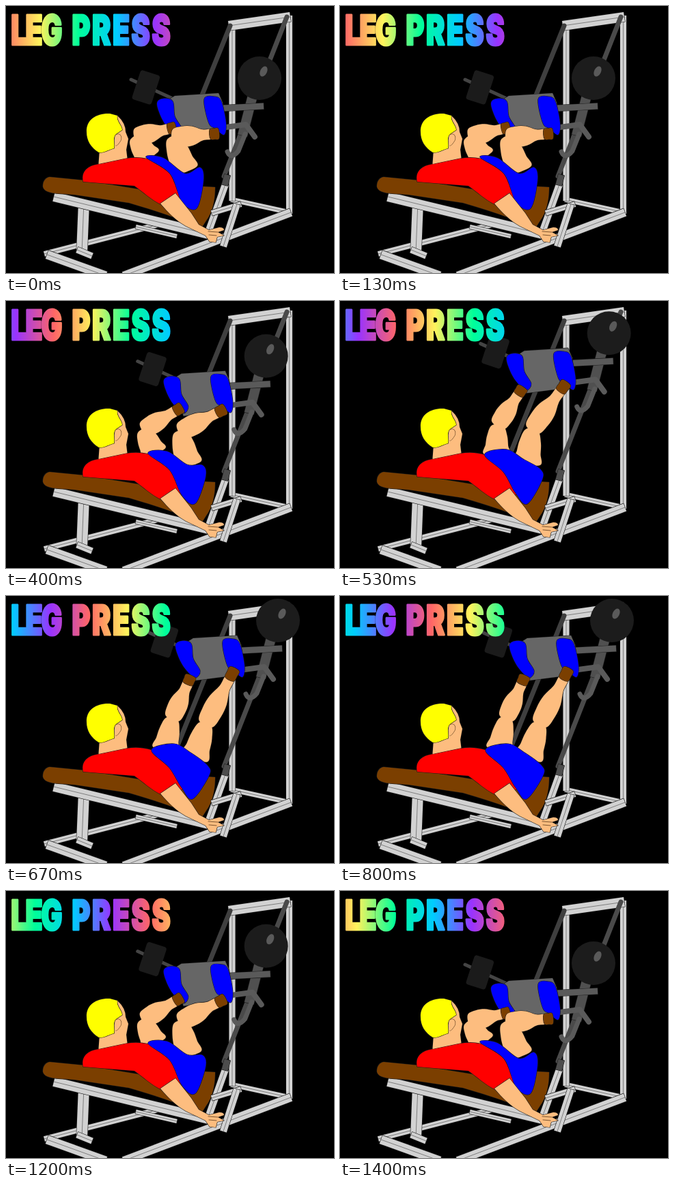
These frames come from a looping animation (480x392 px, 1470 ms). An HTML page:

```html
<!DOCTYPE html>
<html lang="en">
<head>
<meta charset="utf-8">
<title>Leg press</title>
<style>
  html, body { margin: 0; width: 100%; height: 100%; overflow: hidden; background: #000; }
  svg { display: block; width: 100vw; height: 100vh; }
  .word { font: 900 61px Inter, Roboto, "Open Sans", sans-serif; }
</style>
</head>
<body>
<svg id="stage" viewBox="0 0 480 392" stroke-linejoin="round" stroke-linecap="round">
  <defs>
    <linearGradient id="rainbow" gradientUnits="userSpaceOnUse" spreadMethod="repeat" x1="0" y1="0" x2="418" y2="0">
      <stop offset="0" stop-color="#ff6666"/>
      <stop offset=".2" stop-color="#fff35c"/>
      <stop offset=".4" stop-color="#00ff99"/>
      <stop offset=".6" stop-color="#00ccff"/>
      <stop offset=".8" stop-color="#9933ff"/>
      <stop offset="1" stop-color="#ff6666"/>
    </linearGradient>
  </defs>
  <rect width="480" height="392"/>
  <g id="rack"></g>
  <g id="farWeight"></g>
  <g id="sled"></g>
  <g id="bench"></g>
  <g id="body"></g>
  <g transform="translate(8 0) scale(.67 1)" fill="url(#rainbow)" stroke="url(#rainbow)" stroke-width="3.2">
    <text class="word" x="-1" y="56.8" letter-spacing="-3">LEG</text>
    <text class="word" x="132" y="56.8" letter-spacing="4">PRESS</text>
  </g>
</svg>
<script>
const LOOP = 1470, STEPS = 22, HOLD = 210, PERIOD = 418;
const STEEL = '#d2d2d2', GREY = '#5a5a5a', SKIN = '#fdbd7f', RED = '#ff0000', BLUE = '#0000ff', BROWN = '#7b3f00';
const $ = id => document.getElementById(id);

function add(parent, tag, attrs) {
  const el = document.createElementNS('http://www.w3.org/2000/svg', tag);
  for (const key in attrs) el.setAttribute(key, attrs[key]);
  return $(parent).appendChild(el);
}

const shape = (parent, fill, d = '', line = '#1a1a1a') =>
  add(parent, 'path', { d, fill, stroke: line, 'stroke-width': 1.2, 'paint-order': 'stroke' });
const rod = (parent, color, width, d) =>
  add(parent, 'path', { d, fill: 'none', stroke: color, 'stroke-width': width });

const mix = (a, b, t) => a.map((v, i) => v + (b[i] - v) * t);
const points = text => text.split(', ').map(pair => pair.split(' ').map(Number));

// Both sides of a bar from a to b, with the widths spread evenly along it
function sides(a, b, widths) {
  const dx = b[0] - a[0], dy = b[1] - a[1], len = Math.hypot(dx, dy);
  const edge = side => widths.map((w, i) => {
    const [x, y] = mix(a, b, i / (widths.length - 1)), r = side * w / 2 / len;
    return [x - dy * r, y + dx * r];
  });
  return [...edge(1), ...edge(-1).reverse()];
}

// Closed smooth curve through the points
function blob(p) {
  const at = i => p[(i + p.length) % p.length];
  const ctrl = (a, b, c) => a.map((v, k) => v + (c[k] - b[k]) / 6);
  return 'M' + p[0] + p.map((q, i) => {
    const next = at(i + 1);
    return 'C' + [ctrl(q, at(i - 1), next), ctrl(next, at(i + 2), q), next].join(' ');
  }).join('') + 'Z';
}

const limb = (a, b, ...widths) => blob(sides(a, b, widths));

function beam(parent, fill, width, x1, y1, x2, y2) {
  shape(parent, fill, 'M' + sides([x1, y1], [x2, y2], [width, width]).join('L') + 'Z');
  if (fill === STEEL)
    add(parent, 'path', { d: `M${x1} ${y1}L${x2} ${y2}`, stroke: '#444', 'stroke-width': .6 });
}

function buildRack() {
  const steel = (...args) => beam('rack', STEEL, ...args);
  steel(7, 329, 284, 415, 303);
  steel(9, 331, 30, 331, 286);
  steel(9, 414.5, 14, 414.5, 305);
  steel(14, 326, 29, 416, 16);
  steel(12, 417, 303, 172, 396);
  steel(8, 56, 364, 230, 319);
  steel(6, 190, 324, 250, 338);
  steel(13, 60, 365, 146, 396);
  rod('rack', '#3f3f3f', 7, 'M328 29L250 222');
  rod('rack', '#4a4a4a', 7, 'M411 16L319 250');
}

function buildSled() {
  rod('farWeight', '#444', 5, 'M183 108L242 135');
  add('farWeight', 'rect', { x: 190, y: 97, width: 30, height: 45, rx: 4, fill: '#1b1b1b', transform: 'rotate(18 205 119)' });
  beam('sled', '#505050', 14, 366, 112, 346, 190);
  beam('sled', GREY, 9, 318, 150, 377, 147);
  rod('sled', GREY, 8, 'M322 178L351 174L364 192');
  rod('sled', GREY, 7, 'M324 214Q329 226 340 213L350 188');
  shape('sled', '#666', 'M236 139L247 132L311 128L317 142L321 183L304 187L250 194Z');
  add('sled', 'circle', { cx: 371, cy: 106, r: 32, fill: '#1c1c1c' });
  add('sled', 'ellipse', { cx: 377, cy: 96, rx: 5, ry: 8, fill: GREY, transform: 'rotate(25 377 96)' });
  shape('sled', BLUE, blob(points('221 143, 230 136, 244 140, 247 162, 257 180, 250 190, 238 180, 228 165')));
  shape('sled', BLUE, blob(points('290 137, 305 133, 315 140, 322 172, 319 189, 307 180, 297 172')));
}

function buildBench() {
  const steel = (...args) => beam('bench', STEEL, ...args);
  steel(16, 114, 288, 111, 362);
  steel(9, 104, 358, 126, 367);
  steel(14, 70, 280, 296, 335);
  shape('bench', BROWN, 'M64 251L115 256L200 270L280 272L288 265L306 266C306 285 302 303 293 315L284 329C255 311 220 301 180 289L100 277C75 275 56 276 54 265C54 257 58 252 64 251Z');
  steel(10, 321, 262, 296, 332);
  beam('bench', '#4d4d4d', 9, 324, 248, 320, 263);
  steel(8, 301, 304, 344, 291);
  steel(10, 338, 291, 318, 353);
}

// Joints and shorts with the knees bent and the legs stretched
const near = { hip: [[262, 242], [276, 238]], knee: [[244, 193], [292, 188]], ankle: [302, 188] };
const far = { hip: [[208, 223], [233, 226]], knee: [[189, 192], [243, 180]], ankle: [240, 180] };
const shorts = [
  points('205 222, 230 223, 262 246, 284 237, 289 256, 279 297, 258 288, 240 246'),
  points('213 226, 246 217, 270 230, 295 249, 297 264, 273 298, 257 281, 239 252')
];
const layers = {};

function buildBody() {
  const layer = (name, fill) => { layers[name] = shape('body', fill); };
  shape('body', SKIN, 'M150 162L163 161Q175 172 175 185L179 195L176 211L178 228L135 238L137 211Z');
  shape('body', '#ffff00', 'M118 185C117 166 134 157 152 158L163 161C161 169 170 175 170 182L161 188C155 194 160 203 158 209C150 211 143 216 136 215C124 208 118 197 118 185Z');
  shape('body', SKIN, 'M160 190C166 185 170 191 168 197Q164 204 161 205', '#6b4a28');
  layer('farLeg', SKIN);
  layer('farAnkle', BROWN);
  shape('body', RED, 'M113 258C109 240 124 233 138 232L176 224C196 220 218 225 233 236C245 250 256 268 258 284L226 291C212 284 202 274 188 264L150 261Z');
  layer('nearLeg', SKIN);
  layer('nearAnkle', BROWN);
  layer('shorts', BLUE);
  shape('body', RED, 'M208 268L236 256Q250 266 253 280L226 291Z', 'none');
  shape('body', SKIN, 'M226 290L248 275L271 304L282 321L297 329L312 325Q319 325 319 329L310 332L319 337L309 339L307 347L298 346L292 337L263 323C249 315 238 304 226 290Z');
  rod('body', '#6b4a28', .9, 'M297 336L308 337M296 331L310 332');
}

function drawLeg(name, leg, thick, u, shift) {
  const hip = mix(...leg.hip, u), knee = mix(...leg.knee, u ** 1.5);
  const ankle = leg.ankle.map((v, i) => v + shift[i]);
  const thigh = limb(hip, knee, thick + 2, thick, thick - 4, thick * .5);
  const calf = limb(knee, ankle, thick * .6, thick - 5, thick - 7, 16, 13);
  layers[name + 'Leg'].setAttribute('d', thigh + calf);
  layers[name + 'Ankle'].setAttribute('d', limb(mix(ankle, knee, .06), mix(ankle, knee, -.16), 13, 16, 14));
}

// How far the sled has gone at each stop of the push
const travel = [0, .36, .84, 1];

function draw(ms) {
  const step = Math.floor((ms % LOOP) / LOOP * STEPS);
  const beat = Math.floor(step * LOOP / STEPS / HOLD);
  const u = travel[Math.min(beat, 6 - beat)];
  const shift = [27 * u, -70 * u], farShift = [27 * u, -54 * u];
  $('sled').setAttribute('transform', `translate(${shift})`);
  $('farWeight').setAttribute('transform', `translate(${farShift})`);
  drawLeg('far', far, 33, u, farShift);
  drawLeg('near', near, 35, u, shift);
  layers.shorts.setAttribute('d', blob(shorts[0].map((p, i) => mix(p, shorts[1][i], u))));
  $('rainbow').setAttribute('gradientTransform', `translate(${PERIOD * step / STEPS - 21})`);
}

buildRack();
buildSled();
buildBench();
buildBody();
const start = performance.now();
function tick() {
  draw(performance.now() - start);
  requestAnimationFrame(tick);
}
tick();
</script>
</body>
</html>
```
